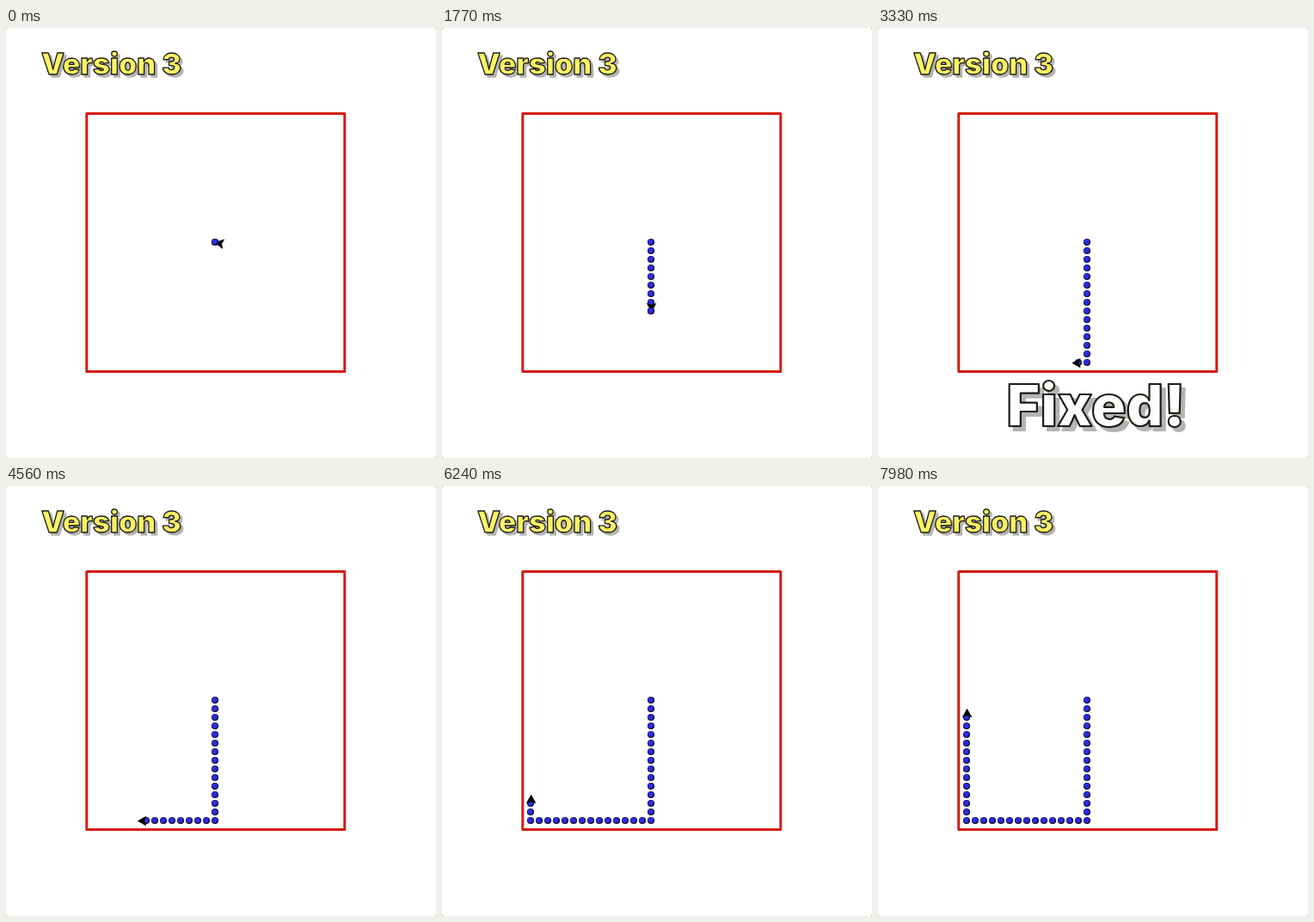
Write an HTML page with a canvas that moves like this. It is 500x500 px and loops after 8 s.

```html
<!DOCTYPE html>
<html lang="en">
<head>
<meta charset="utf-8">
<style>
  html, body { margin: 0; height: 100%; overflow: hidden; background: #fff; }
  canvas { display: block; }
</style>
</head>
<body>
<canvas id="stage" width="500" height="500"></canvas>
<script>
const ctx = document.getElementById('stage').getContext('2d');
const LOOP = 8000;
const STEP = 10, HOPS = 4, HOP_MS = 11;   // each step is made in four quick hops
const CYCLE = 170, DOT_DELAY = 85;        // step period and pause before a dot
const MOVES = 14, TURN_MS = 380;
const FIXED_ON = 2800, FIXED_OFF = 4350;

// heading in canvas degrees: 90 down, 180 left, 270 up
const legs = [
  { start: 435, x: 243, y: 249, heading: 90 },
  { start: 3130, x: 243, y: 389, heading: 180 },
  { start: 5860, x: 103, y: 389, heading: 270 },
];

const along = (leg, distance) => {
  const a = leg.heading * Math.PI / 180;
  return { x: leg.x + Math.cos(a) * distance, y: leg.y + Math.sin(a) * distance };
};
const clamp = (v, lo, hi) => Math.max(lo, Math.min(hi, v));

function legState(leg, t) {
  const elapsed = t - leg.start;
  const done = Math.min(Math.floor(elapsed / CYCLE), MOVES);
  if (done === MOVES) return { distance: MOVES * STEP, count: MOVES };
  const phase = elapsed - done * CYCLE;
  const hops = Math.min(HOPS, Math.floor(phase / HOP_MS) + 1);
  return {
    distance: (done + hops / HOPS) * STEP,
    count: done + (phase >= DOT_DELAY ? 1 : 0),
  };
}

function headingAt(t) {
  const [first, ...later] = legs;
  const firstTurnEnd = first.start - 10;
  let heading = first.heading + Math.max(0, firstTurnEnd - t) * 90 / TURN_MS;
  later.forEach((leg, i) => {
    const turnStart = legs[i].start + (MOVES - 1) * CYCLE + DOT_DELAY;
    heading += 90 * clamp((t - turnStart) / TURN_MS, 0, 1);
  });
  return heading;
}

function circle(x, y, r, color) {
  ctx.fillStyle = color;
  ctx.beginPath();
  ctx.arc(x, y, r, 0, 2 * Math.PI);
  ctx.fill();
}

function drawDot({ x, y }) {
  circle(x, y, 4.1, '#12123f');
  circle(x - .4, y - .4, 3.1, '#2c2ce0');
}

function drawArrow({ x, y }, heading) {
  ctx.save();
  ctx.translate(x + .6, y + .5);
  ctx.rotate(heading * Math.PI / 180);
  ctx.beginPath();
  ctx.moveTo(0, 0);
  ctx.lineTo(-9, -5);
  ctx.lineTo(-7, 0);
  ctx.lineTo(-9, 5);
  ctx.closePath();
  ctx.fillStyle = ctx.strokeStyle = '#000';
  ctx.lineWidth = 1;
  ctx.fill();
  ctx.stroke();
  ctx.restore();
}

function drawTitle(text, x, y, size, fill, outline, shadow) {
  ctx.font = `900 ${size}px Inter, sans-serif`;
  ctx.lineJoin = 'round';
  ctx.lineWidth = outline;
  ctx.fillStyle = ctx.strokeStyle = '#b4b4b4';
  ctx.fillText(text, x + shadow, y + shadow);
  ctx.strokeText(text, x + shadow, y + shadow);
  ctx.fillStyle = fill;
  ctx.strokeStyle = '#1c1c14';
  ctx.fillText(text, x, y);
  ctx.strokeText(text, x, y);
}

function draw(t) {
  ctx.fillStyle = '#777';
  ctx.fillRect(0, 0, 500, 500);
  ctx.fillStyle = '#fff';
  ctx.beginPath();
  ctx.roundRect(0, 0, 500, 500, 2);
  ctx.fill();

  ctx.lineJoin = 'round';
  ctx.lineWidth = 3;
  ctx.strokeStyle = '#d41c14';
  ctx.strokeRect(93.8, 99.6, 300, 300);

  const dots = [legs[0]];
  let tip = legs[0];
  for (const leg of legs) {
    if (t < leg.start) break;
    const { distance, count } = legState(leg, t);
    for (let i = 1; i <= count; i++) dots.push(along(leg, i * STEP));
    tip = along(leg, distance);
  }

  dots.forEach(drawDot);
  drawArrow(tip, headingAt(t));
  // a fresh dot covers the tip until the arrow moves on
  const last = dots[dots.length - 1];
  if (Math.hypot(last.x - tip.x, last.y - tip.y) < .1) drawDot(last);

  drawTitle('Version 3', 41, 54, 34, '#fbf265', 1.3, 3);
  if (t >= FIXED_ON && t < FIXED_OFF) drawTitle('Fixed!', 149.5, 463, 67, '#fff', 2.2, 5);
}

function tick() {
  draw(performance.now() % LOOP);
  requestAnimationFrame(tick);
}
tick();
</script>
</body>
</html>
```
